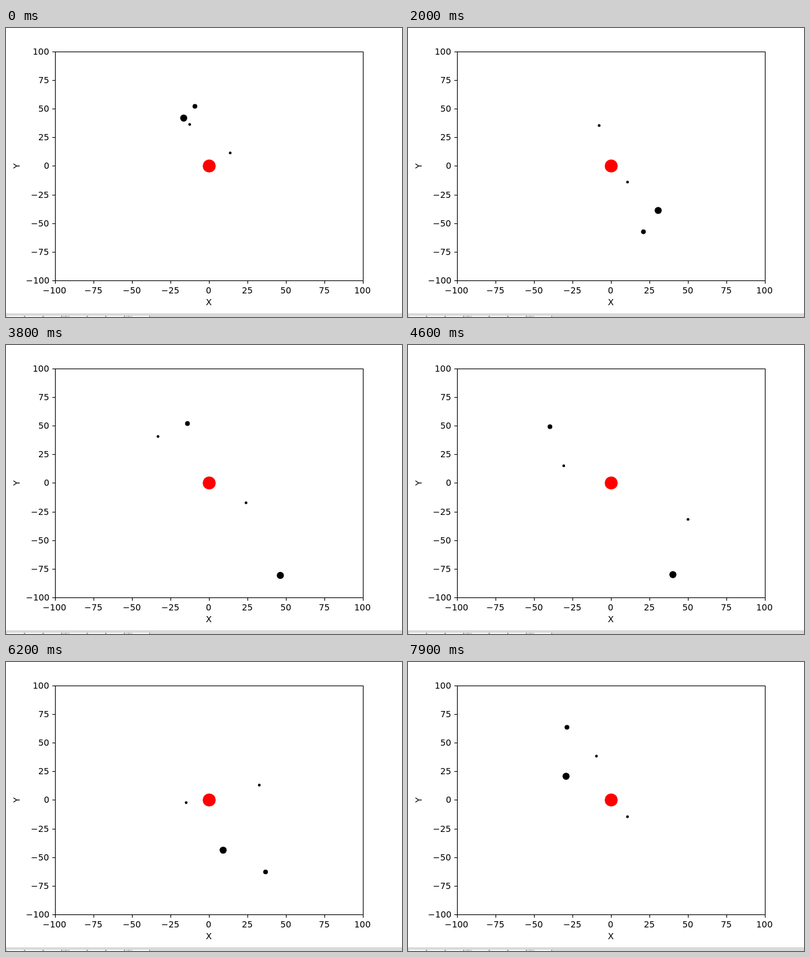
Recreate the animation shown at these times as an HTML page with a canvas. Size 638 px wide and 466 px high, loop 8000 ms.

```html
<!DOCTYPE html>
<html>
<head>
<meta charset="utf-8">
<style>
  html, body { margin: 0; width: 100%; height: 100%; overflow: hidden; background: #fff; }
  canvas { display: block; }
</style>
</head>
<body>
<canvas id="stage" width="638" height="466"></canvas>
<script>
const ctx = document.getElementById("stage").getContext("2d");
const LOOP = 8000, STEP = 100;
const px = x => 327.4 + 2.48 * x;
const py = y => 222.5 - 1.848 * y;

const smooth = k => {
  k = Math.min(1, Math.max(0, k));
  return k * k * (3 - 2 * k);
};

// A spring-like swing. A close encounter between the times from and to delays it by lag;
// growth changes its size per second.
const swing = (size, speed, phase, { growth = 0, lag = 0, from = 0, to = 1 } = {}) => t =>
  size * (1 + growth * t) * Math.cos(speed * t + phase - lag * smooth((t - from) / (to - from)));

const bodies = [
  { r: 5.7,
    x: swing(47.5, .532, -1.927, { growth: -.006 }),
    y: swing(85.5, .496, 1.06, { growth: -.01 }) },
  { r: 3.8,
    x: swing(40, 1.64, -1.805, { lag: 2.495, from: 0, to: 2 }),
    y: swing(64, 1.652, -.62) },
  { r: 2.2,
    x: swing(52, 3.189, -1.817),
    y: swing(40.7, 3.165, .473) },
  { r: 2.2,
    x: swing(31, 3.195, 1.115),
    y: swing(17.3, 3.185, -.85, { lag: 1.753, from: .8, to: 1.4 }) }
];

function dot(x, y, r, color) {
  ctx.fillStyle = color;
  ctx.beginPath();
  ctx.arc(px(x), py(y), r, 0, 7);
  ctx.fill();
}

function line(x1, y1, x2, y2) {
  ctx.beginPath();
  ctx.moveTo(x1, y1);
  ctx.lineTo(x2, y2);
  ctx.stroke();
}

function rect(color, ...box) {
  ctx.fillStyle = color;
  ctx.fillRect(...box);
}

// Text starts on a whole pixel; align is the share of its width left of x.
function text(label, x, y, align) {
  ctx.fillText(label, Math.floor(x - align * ctx.measureText(label).width), y);
}

function drawAxes() {
  ctx.fillStyle = ctx.strokeStyle = "#000";
  ctx.lineWidth = 1.1;
  ctx.font = "13.89px 'DejaVu Sans', sans-serif";
  ctx.textAlign = "left";
  ctx.strokeRect(79.5, 38.5, 496, 369);
  for (let i = 0; i <= 8; i++) {
    const label = String(i * 25 - 100).replace("-", "\u2212");
    const x = 79.5 + 62 * i;
    const y = Math.round(407.2 - 46.2 * i) + .5;
    line(x, 407.5, x, 412.4);
    line(74.6, y, 79.5, y);
    text(label, x - .5, 428, .5);
    text(label, 70.25, y + 4.7, 1);
  }
  text("X", 327, 447, .5);
  ctx.save();
  ctx.translate(22, 222.5);
  ctx.rotate(-Math.PI / 2);
  ctx.textAlign = "center";
  ctx.fillText("Y", 0, 0);
  ctx.restore();
}

function drawToolbar() {
  rect("#d9d9d9", 0, 460, 638, 6);
  for (const x of [2, 32, 62, 103, 133, 163, 204]) {
    rect("#fff", x, 464, 28, 1);
    rect("#f0f0f0", x, 465, 28, 1);
    rect("#777", x + 27, 464, 1, 2);
  }
  for (const x of [96, 197]) rect("#a0a0a0", x, 464, 1, 2);
}

function frame(now) {
  const t = Math.floor(now % LOOP / STEP) * STEP / 1000;
  rect("#fff", 0, 0, 638, 466);
  dot(0, 0, 10.5, "#f00");
  for (const { x, y, r } of bodies) dot(x(t), y(t), r, "#000");
  drawAxes();
  drawToolbar();
  requestAnimationFrame(frame);
}
frame(0);
</script>
</body>
</html>
```
